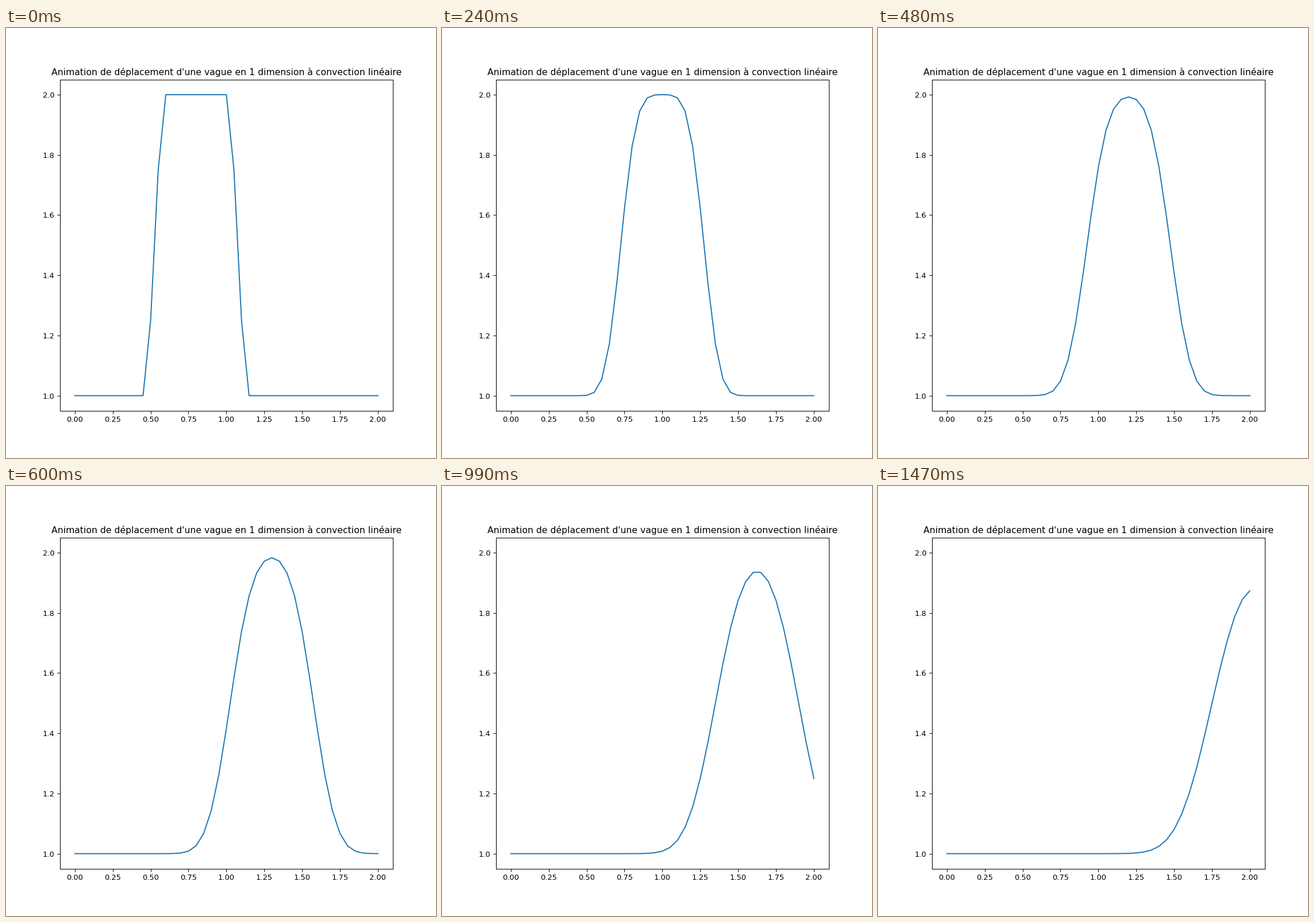
A matplotlib script for the animation above (1500 ms loop, 748 px wide and 748 px high).

```python
import numpy as np
import matplotlib.pyplot as plt
from matplotlib.animation import FuncAnimation

SIDE, DPI = 8, 93.5  # 748 px square
FRAMES, INTERVAL = 50, 30
NX = 41
COURANT = 0.5  # c * dt / dx

x = np.linspace(0, 2, NX)


def step(u):
    """One upwind step of linear convection."""
    new = u.copy()
    new[1:] -= COURANT * (u[1:] - u[:-1])
    return new


def solve(steps):
    u = np.ones(NX)
    u[10:21] = 2  # square pulse on 0.5 <= x <= 1
    for _ in range(steps):
        u = step(u)
    return u


fig, ax = plt.subplots(figsize=(SIDE, SIDE), dpi=DPI)
ax.set_xlim(-0.1, 2.1)
ax.set_ylim(0.95, 2.05)
ax.set_title("Animation de déplacement d'une vague en 1 dimension à convection linéaire")
line, = ax.plot(x, solve(2), color="tab:blue", lw=1.5)


def update(frame):
    line.set_ydata(solve(frame + 2))
    return line,


anim = FuncAnimation(fig, update, frames=FRAMES, interval=INTERVAL,
                     repeat=True, repeat_delay=0)
plt.show()
```
